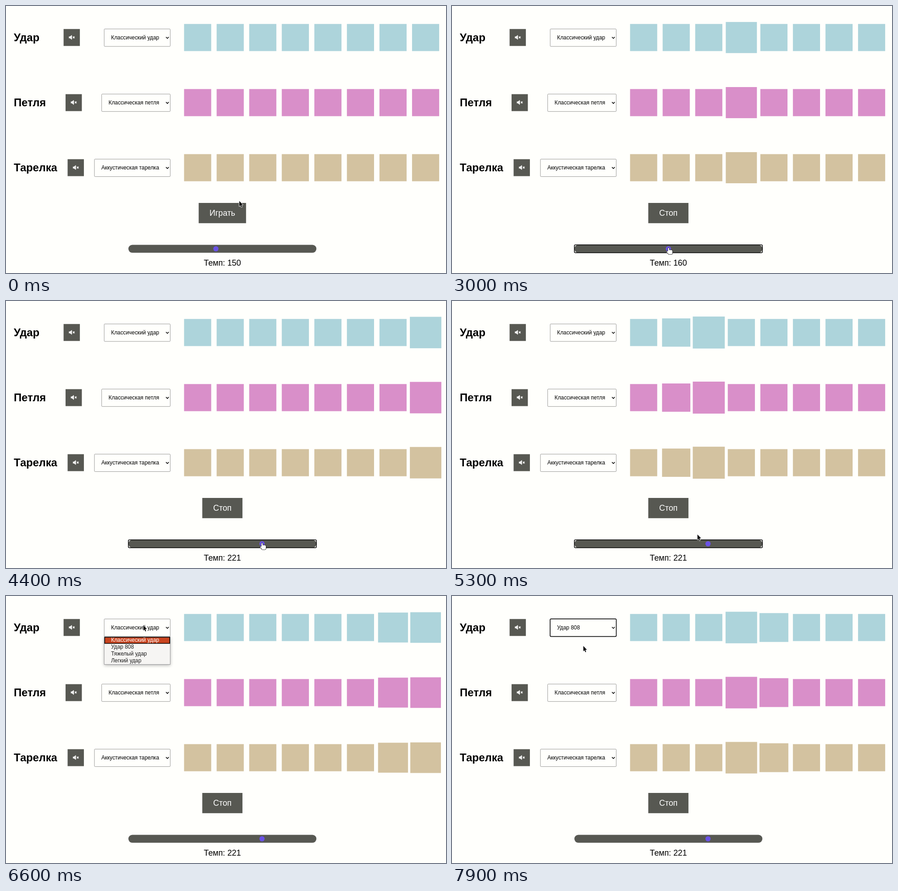
These frames come from a looping animation (960x583 px, 8000 ms). An HTML page with a canvas:

```html
<!DOCTYPE html>
<html lang="ru">
<head>
<meta charset="utf-8">
<title>Драм-машина</title>
<style>
html, body { margin: 0; width: 100%; height: 100%; overflow: hidden; background: #fffffc; }
canvas { display: block; }
</style>
</head>
<body>
<canvas id="stage" width="960" height="583"></canvas>
<script>
const ctx = document.getElementById('stage').getContext('2d');
const LOOP = 8000, STEP = 100;
const ZOOM = 960 / 1297; // the page is laid out 1297 px wide
const BG = '#fffffc', DARK = '#575852', ACCENT = '#6a52e6';
const FONT = '"Liberation Sans", Arial, sans-serif';

const LEFT = 23, SELECT_RIGHT = 484.6, MIDDLE = 637.8;
const ROW = { first: 93, pitch: 192 };
const PAD = { x: 524.9, size: 80, pitch: 96, count: 8 };
const SLIDER = { x: 360.7, y: 716.2, w: 554.3, h: 23.2, inset: 9, min: 20, max: 300 };

const ROWS = [
  { title: 'Удар', value: 'Классический удар', color: '#add4db' },
  { title: 'Петля', value: 'Классическая петля', color: '#d98fc9' },
  { title: 'Тарелка', value: 'Аккустическая тарелка', color: '#d3c2a0' }
];
const KICKS = ['Классический удар', 'Удар 808', 'Тяжелый удар', 'Легкий удар'];

const AT = { play: 993, press: 2690, drag: 2830, release: 4253, open: 6450, hover: 6990, pick: 7390 };
const SLOW = 150, FAST = 221, PULSE = 300;

// Cursor moves in stage pixels
const MOVES = [
  { from: 450, to: 700, x: 502, y: 443 },
  { from: 1450, to: 2700, x: 458.5, y: 528.5 },
  { from: AT.drag, to: 4050, x: 558.6, y: 529 },
  { from: 5020, to: 5300, x: 535, y: 509 },
  { from: 5300, to: 6400, x: 299, y: 63 },
  { from: 6850, to: 7200, x: 286, y: 108.3 }
];
const ARROW = new Path2D('M.5 .8V12.5L3 10.2 4.9 14.4 6.7 13.6 5 9.5 8.4 9.1Z');
const SPEAKER = new Path2D('M-8.4 -2.7h3.5l5.3 -4.5v14.4l-5.3 -4.5h-3.5z');
const HAND = new Path2D();
HAND.roundRect(-1.2, -0.6, 2.5, 10, 1.2);
HAND.roundRect(-1.2, 4.3, 9.6, 9.4, 2.8);
HAND.roundRect(-4, 6.9, 4.5, 3.2, 1.5);

const clamp = (v, lo, hi) => Math.min(hi, Math.max(lo, v));

// cubic-bezier(.42, 0, .58, 1)
function easeInOut(x) {
  let lo = 0, hi = 1;
  for (let i = 0; i < 18; i++) {
    const u = (lo + hi) / 2, v = 1 - u;
    if (1.26 * u * v * v + 1.74 * u * u * v + u * u * u < x) lo = u; else hi = u;
  }
  return lo * lo * (3 - 2 * lo);
}

function cursorAt(t) {
  let x = 508.5, y = 425;
  for (const move of MOVES) {
    const p = clamp((t - move.from) / (move.to - move.from), 0, 1);
    x += (move.x - x) * p;
    y += (move.y - y) * p;
  }
  return { x, y };
}

// The tempo change restarts the beat timer
const beatStart = n => n < PAD.count
  ? AT.play + (n + 1) * 60000 / SLOW
  : AT.release + (n - PAD.count + 1) * 60000 / FAST;

function padScale(col, t) {
  let scale = 1;
  for (let n = col; beatStart(n) < t; n += PAD.count) {
    const age = (t - beatStart(n)) / PULSE;
    if (age < 2) scale += 0.2 * easeInOut(age < 1 ? age : 2 - age);
  }
  return scale;
}

function setFont(size, weight = 'normal') {
  ctx.font = `${weight} ${size}px ${FONT}`;
}

function textWidth(str, size, weight) {
  setFont(size, weight);
  return ctx.measureText(str).width;
}

// y is the middle of the line
function text(str, x, y, size, color = '#000', align = 'left', weight) {
  setFont(size, weight);
  ctx.textAlign = align;
  ctx.fillStyle = color;
  ctx.fillText(str, x, y + size * 0.345);
}

function box(x, y, w, h, r, fill, stroke, line = 1) {
  ctx.beginPath();
  ctx.roundRect(x, y, w, h, r);
  if (fill) { ctx.fillStyle = fill; ctx.fill(); }
  if (stroke) { ctx.strokeStyle = stroke; ctx.lineWidth = line; ctx.stroke(); }
}

const focusRing = (x, y, w, h) => box(x, y, w, h, 3, null, '#000', 2);

function line(...points) {
  ctx.beginPath();
  for (const [x, y] of points) ctx.lineTo(x, y);
  ctx.lineWidth = 2;
  ctx.stroke();
}

function muteButton(x, y) {
  box(x, y - 25, 48, 50, 0, DARK);
  ctx.save();
  ctx.translate(x + 24, y - 0.5);
  ctx.fillStyle = ctx.strokeStyle = '#fff';
  ctx.fill(SPEAKER);
  line([3.2, -2.7], [8.4, 2.7]);
  line([8.4, -2.7], [3.2, 2.7]);
  ctx.restore();
}

function select(x, y, value, focused) {
  const w = SELECT_RIGHT - x, top = y - 25.8;
  box(x + 0.5, top + 0.5, w - 1, 51.5, 2, BG, '#767676');
  if (focused) focusRing(x + 0.3, top + 0.3, w - 0.6, 52);
  text(value, x + 20.8, y + 0.3, 16);
  ctx.strokeStyle = '#000';
  line([471.5, y - 1.6], [475.7, y + 2.6], [479.9, y - 1.6]);
}

function dropdown(x, active) {
  const w = SELECT_RIGHT - x, top = 119.6, h = 20.2;
  ctx.save();
  ctx.shadowColor = 'rgba(0,0,0,.3)';
  ctx.shadowBlur = 7;
  ctx.shadowOffsetY = 2;
  box(x, top, w, KICKS.length * h + 2, 0, '#f6f5f3');
  ctx.restore();
  box(x + 0.5, top + 0.5, w - 1, KICKS.length * h + 1, 0, null, '#77777a');
  KICKS.forEach((name, i) => {
    const y = top + 1 + i * h, on = i === active;
    if (on) box(x + 2, y + 1, w - 4, h - 2, 0, '#c9441f', '#000', 2);
    text(name, x + 20.8, y + h / 2 - 0.6, 16, on ? '#fff' : '#1c1c1c');
  });
}

function track(row, i, t, scales) {
  const y = ROW.first + i * ROW.pitch;
  const titleEnd = LEFT + textWidth(row.title, 32, 'bold');
  const selectX = SELECT_RIGHT - textWidth(row.value, 16) - 54;
  const changed = i === 0 && t >= AT.pick;
  text(row.title, LEFT, y, 32, '#000', 'left', 'bold');
  muteButton((titleEnd + selectX) / 2 - 24, y);
  select(selectX, y, changed ? KICKS[1] : row.value, changed);
  ctx.fillStyle = row.color;
  scales.forEach((scale, col) => {
    const size = PAD.size * scale;
    const cx = PAD.x + PAD.size / 2 + col * PAD.pitch;
    ctx.fillRect(cx - size / 2, y - size / 2, size, size);
  });
  if (i === 0 && t >= AT.open && t < AT.pick) dropdown(selectX, t >= AT.hover ? 1 : 0);
}

function playButton(t) {
  const label = t < AT.play ? 'Играть' : 'Стоп';
  const w = textWidth(label, 24) + 64, x = MIDDLE - w / 2;
  box(x, 581, w, 59.7, 0, DARK);
  if (t >= AT.play && t < AT.press) focusRing(x, 581, w, 59.7);
  text(label, MIDDLE, 610.6, 24, '#fff', 'center');
}

function slider(t, cursorX) {
  const { x, y, w, h, inset, min, max } = SLIDER;
  const start = x + inset, perBeat = (w - 2 * inset) / (max - min);
  const dragged = Math.round(min + (cursorX - start) / perBeat);
  const tempo = t < AT.drag ? SLOW : t < AT.release ? clamp(dragged, SLOW, FAST) : FAST;
  box(x, y - h / 2, w, h, h / 2, DARK);
  if (t >= AT.press && t < AT.open) focusRing(x, y - h / 2, w, h);
  ctx.beginPath();
  ctx.arc(start + (tempo - min) * perBeat, y, 7.7, 0, 2 * Math.PI);
  ctx.fillStyle = ACCENT;
  ctx.fill();
  text('Темп: ' + tempo, MIDDLE, 757.2, 24, '#000', 'center');
}

function drawCursor({ x, y }) {
  const within = (cy, halfW, halfH) => Math.abs(x - 472) < halfW && Math.abs(y - cy) < halfH;
  const hand = within(452, 52, 22) || within(530, 205, 9);
  const shape = hand ? HAND : ARROW;
  ctx.save();
  ctx.translate(x, y);
  ctx.lineJoin = 'round';
  ctx.lineWidth = 1.5;
  ctx.strokeStyle = hand ? '#111' : '#fff';
  ctx.fillStyle = hand ? '#fff' : '#111';
  ctx.stroke(shape);
  ctx.fill(shape);
  ctx.restore();
}

function draw(t) {
  ctx.fillStyle = BG;
  ctx.fillRect(0, 0, 960, 583);
  const cursor = cursorAt(t);
  const scales = Array.from({ length: PAD.count }, (_, col) => padScale(col, t));
  ctx.save();
  ctx.scale(ZOOM, ZOOM);
  ROWS.forEach((row, i) => track(row, i, t, scales));
  playButton(t);
  slider(t, cursor.x / ZOOM);
  ctx.restore();
  drawCursor(cursor);
}

const start = performance.now();
function tick() {
  draw(Math.floor((performance.now() - start) % LOOP / STEP) * STEP);
  requestAnimationFrame(tick);
}
tick();
</script>
</body>
</html>
```
